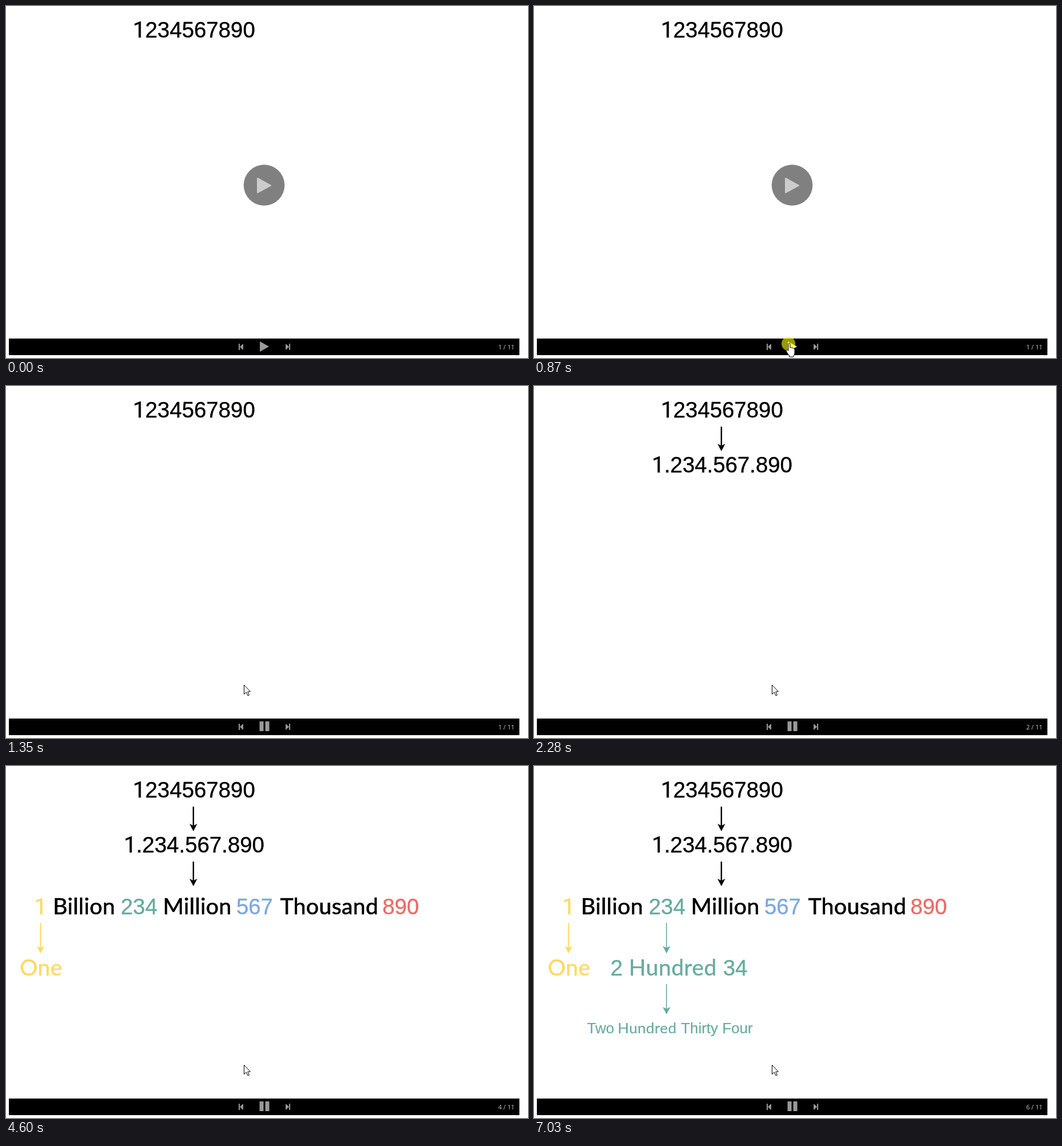
An HTML page that plays this animation: 911x615 px, repeating every 8 s.

```html
<!DOCTYPE html>
<html lang="en">
<head>
<meta charset="utf-8">
<title>Reading a large number</title>
<style>
  html, body { margin: 0; width: 100%; height: 100%; overflow: hidden; background: #fff; }
  svg { display: block; }
  text { font: 38.3px "Liberation Sans", Arial, sans-serif; stroke: currentColor; stroke-width: .4; }
  .one { font-family: Roboto, sans-serif; }
  .word { font-family: "Comic Sans MS", Lato, sans-serif; font-size: 39px; letter-spacing: .4px; }
  .heavy { stroke-width: .7; }
  .small { font-size: 25.9px; stroke-width: .2; }
  #count { font: 11px "Open Sans", "Noto Sans", sans-serif; text-anchor: end; fill: #c4c4c4; stroke: none; }
</style>
</head>
<body>
<svg width="911" height="615" viewBox="0 0 911 615">
  <g id="slides"></g>
  <g id="overlay">
    <circle cx="450.5" cy="313" r="35.7" fill="#808080"/>
    <path d="M439 301V326L462 313.7Z" fill="#ccc" stroke="#ccc" stroke-width="2" stroke-linejoin="round"/>
  </g>
  <path d="M5 581H896V610H5Z"/>
  <g fill="#999">
    <path d="M406 590h2v11h-2zM414 590v11l-6-5.5z"/>
    <path d="M488 590v11l6-5.5zM494 590h2v11h-2z"/>
    <path id="button"/>
  </g>
  <text id="count" x="887.5" y="600"></text>
  <circle id="press" cx="444" cy="590" r="12" fill="#ff0" opacity=".6"/>
  <g id="cursor" fill="#fff" stroke="#000" stroke-linejoin="round">
    <path id="pointer" d="M.5 .5V16.5L4.3 13L7 19L9.4 18L6.8 12H11.5Z"/>
    <path id="hand" d="M0 1Q0-1 1.5-1T3 1V7Q5 5.5 6 7.5Q8 6.5 9 8.5Q11 8 11 10.5V16Q11 19 9 21V23H1.5V21Q-4 14-4 11.5Q-3 9.5 0 12Z"/>
  </g>
</svg>
<script>
const LOOP = 8000;
const BLACK = '#000', YELLOW = '#ffd966', GREEN = '#67ab9f', BLUE = '#7ea6e0', RED = '#ea6b66';
const PLAY = 'M443 586V604L459 595Z', PAUSE = 'M442.5 586h7v17h-7zM452.5 586h7v17h-7z';
const $ = id => document.getElementById(id);

const text = (x, y, str, color, cls = '') =>
  `<text x="${x}" y="${y}" fill="${color}" color="${color}" class="${cls}">${
    str.replace(/1/g, '<tspan class="one">1</tspan>')}</text>`;
const word = (x, y, str, color, cls = '') => text(x, y, str, color, 'word ' + cls);
const arrow = (x, top, tip, color, width) =>
  `<path d="M${x} ${top}V${tip - 8}" stroke="${color}" stroke-width="${width}"/>` +
  `<path d="M${x} ${tip}l-6.7-13l6.7 3.3l6.7-3.3z" fill="${color}"/>`;

// Each step stays on the page once its start time is reached.
const steps = [
  [0, text(221.5, 54.7, '1234567890', BLACK)],
  [2200, arrow(327, 71, 114, BLACK, 2.4) + text(205.7, 150.8, '1.234.567.890', BLACK)],
  [3440, arrow(327, 167, 210, BLACK, 2.4) +
    text(49.5, 258.7, '1', YELLOW) + word(82, 259, 'Billion', BLACK, 'heavy') +
    text(200.3, 258.7, '234', GREEN) + word(274, 259, 'Million', BLACK, 'heavy') +
    text(402, 258.7, '567', BLUE) + word(478.5, 259, 'Thousand', BLACK, 'heavy') +
    text(657, 258.7, '890', RED)],
  [4600, arrow(60.3, 274, 327.5, YELLOW, 2) + word(24, 366.3, 'One', YELLOW)],
  [5780, arrow(231.3, 274, 327.5, GREEN, 1.6) + text(133.5, 365.7, '2', GREEN) +
    word(165.5, 366.3, 'Hundred', GREEN) + text(330, 365.7, '34', GREEN)],
  [7030, arrow(231.3, 381, 434, GREEN, 1.6) + text(92.5, 467, 'Two', GREEN, 'small') +
    word(146, 467.3, 'Hundred', GREEN, 'small') + text(256.5, 467, 'Thirty Four', GREEN, 'small')]
];
$('slides').innerHTML = steps.map(step => `<g>${step[1]}</g>`).join('');
const groups = [...$('slides').children];

const show = (el, on) => el.setAttribute('visibility', on ? 'visible' : 'hidden');
const mix = (a, b, k) => a + (b - a) * k;

// The mouse moves in coarse ticks, as a screen recorder samples it.
function mouse(t) {
  if (t < 1190) {
    const tick = Math.max(0, Math.min(7, Math.floor((t - 180) / 77)));
    const k = 1 - (1 - tick / 7) ** 2;
    return [mix(415, 444, k), mix(611, 590, k)];
  }
  const k = 1 - (1 - Math.min(3, Math.floor((t - 1190) / 80) + 1) / 3) ** 2;
  return [mix(444, 415, k), mix(590, 522, k)];
}

function draw(now) {
  const t = now % LOOP;
  const page = steps.filter(step => t >= step[0]).length;
  groups.forEach((group, i) => show(group, i < page));
  $('count').textContent = `${page} / 11`;

  const [x, y] = mouse(t);
  const visible = t >= 180;
  const hover = visible && x > 440 && y > 581;
  $('cursor').setAttribute('transform', `translate(${Math.round(x)} ${Math.round(y)})`);
  show($('pointer'), visible && !hover);
  show($('hand'), hover);

  const playing = t >= 1040;
  show($('overlay'), !playing);
  show($('press'), t >= 870 && !playing);
  $('button').setAttribute('d', playing ? PAUSE : PLAY);
  $('button').setAttribute('fill', hover ? '#fff' : '#999');
  requestAnimationFrame(draw);
}
draw(0);
</script>
</body>
</html>
```
